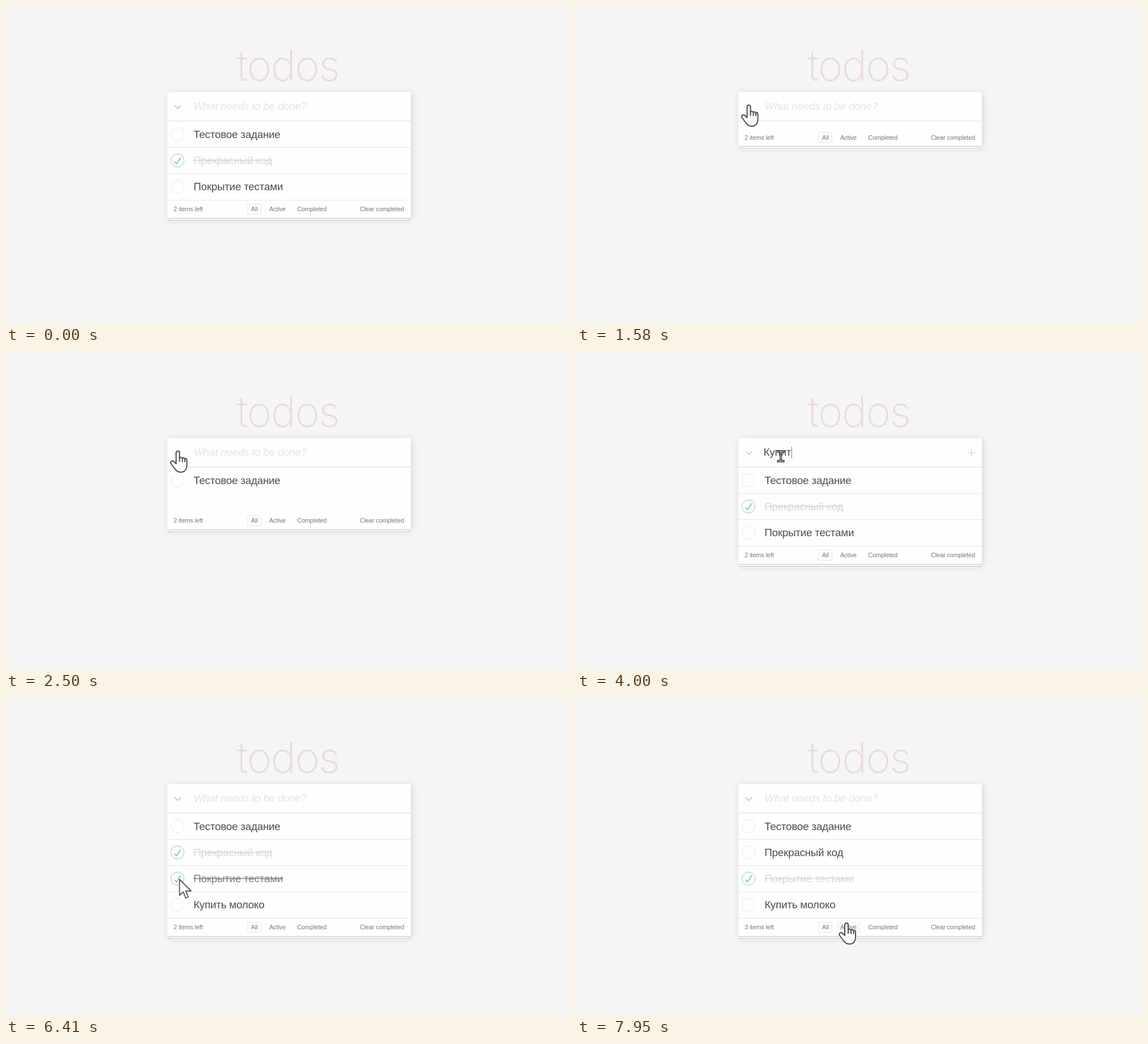
Animation, 998 px wide and 561 px high, one loop 8000 ms. Source, as an HTML page:

```html
<!DOCTYPE html>
<html lang="ru">
<head>
<meta charset="utf-8">
<title>todos</title>
<style>
  html, body { margin: 0; width: 100%; height: 100%; overflow: hidden; background: #f5f5f5; }
  body { position: relative; font: 24px/1.2 "Liberation Sans", Arial, sans-serif; color: #4d4d4d; }
  #overlay { position: absolute; left: 0; top: 0; }
  #title { font: 200 75px Inter, Roboto, sans-serif; letter-spacing: -1.8px; fill: #ecdada; text-anchor: middle; }
  #app {
    position: absolute; left: 284.5px; top: 152px; width: 550px;
    transform: scale(.7818); transform-origin: 0 0;
    background: #fefefd; letter-spacing: -.25px;
    box-shadow: 3px 3px 16px rgba(0,0,0,.13);
  }
  header { position: relative; height: 65px; border-bottom: 1px solid #dcdcdc; box-shadow: inset 0 -2px 1px rgba(0,0,0,.03); }
  header span { position: absolute; left: 59px; top: 18px; white-space: pre; }
  #placeholder { font-style: italic; color: #e4e4e4; }
  #typed { left: 57px; }
  #caret { position: absolute; top: 19px; width: 1.3px; height: 27px; background: #555; }
  header svg { position: absolute; left: 0; top: 0; fill: none; stroke: #d6d6d6; }
  ul { position: relative; margin: 0; padding: 0; list-style: none; overflow: hidden; }
  li { position: absolute; left: 0; width: 550px; height: 59px; }
  li + li { box-shadow: 0 -1px #e4e4e4; }
  li span { position: absolute; left: 59px; top: 15px; white-space: nowrap; }
  li svg { position: absolute; left: 0; top: 9px; fill: none; overflow: visible; }
  footer { position: relative; height: 40px; border-top: 1px solid; font-size: 14px; line-height: 20px; color: #777; letter-spacing: -.12px; }
  footer::before {
    content: ""; position: absolute; left: 0; right: 0; bottom: 0; height: 50px;
    box-shadow: 0 1px 1px rgba(0,0,0,.2), 0 8px 0 -3px #f6f6f6, 0 9px 1px -3px rgba(0,0,0,.2),
                0 16px 0 -6px #f6f6f6, 0 17px 2px -6px rgba(0,0,0,.2);
  }
  footer div { position: absolute; top: 10px; left: 14px; right: 15px; }
  footer a { margin: 3px; padding: 3px 7px; border: 1px solid transparent; border-radius: 3px; }
  #all { border-color: rgba(175,47,47,.2); }
  #active.hover { border-color: rgba(175,47,47,.05); background: #faf9f9; }
</style>
</head>
<body>
<div id="app">
  <header>
    <span id="placeholder">What needs to be done?</span>
    <span id="typed"></span>
    <i id="caret"></i>
    <svg width="550" height="65">
      <path id="chevron" d="M-7.5 -3.5L0 3.2L7.5 -3.5"/>
      <path id="plus" d="M518 33h17M526.5 24.5v17" stroke-width="2"/>
    </svg>
  </header>
  <ul id="list"></ul>
  <footer id="footer">
    <div id="count"></div>
    <div style="text-align:center"><a id="all">All</a> <a id="active">Active</a> <a>Completed</a></div>
    <div style="text-align:right">Clear completed</div>
  </footer>
</div>
<svg id="overlay" width="998" height="561" viewBox="0 0 998 561">
  <text id="title" x="498" y="132">todos</text>
  <g id="cursor" stroke-linejoin="round" stroke-linecap="round">
    <path id="arrow" d="M.5 0V28L7 22L11.5 33L16 31L11.5 20.5H21Z" fill="#fff" stroke="#55555c" stroke-width="1.8"/>
    <g id="hand" fill="#fff" stroke="#4a4c58" stroke-width="2">
      <path d="M-3 22V3a3 3 0 0 1 6 0V12q2.5-2.500 5 .5q2.5-2 4.5 1q3.5-1.500 3.500 3V24C16 32 12 37 5 37C-1 37-3 34-6 30L-12 22C-14 18-10 15.5-7 18Z"/>
      <path d="M3 12v6M8 12.5v6M12.5 13.5v5" fill="none"/>
    </g>
    <g id="beam" fill="none">
      <path d="M-4.5 -8.5H4.5M0 -8.5V8.5M-4.5 8.5H4.5" stroke="#333" stroke-width="4" stroke-linecap="square"/>
      <path d="M-4.5 -8.5H4.5M0 -8.5V8.5M-4.5 8.5H4.5" stroke="#ddd" stroke-width="1.2"/>
    </g>
  </g>
</svg>
<script>
const LOOP = 8000, ROW = 59;
const $ = id => document.getElementById(id);
const clamp = v => Math.min(1, Math.max(0, v));
const span = (t, from, to) => clamp((t - from) / (to - from));
const mix = (a, b, p) => a + (b - a) * p;
const show = (el, on) => { el.style.visibility = on ? 'visible' : 'hidden'; };

const ease = {
  in: p => p ** 1.6,
  out: p => 1 - (1 - p) ** 2,
  both: p => p * p * (3 - 2 * p)
};

// [start, end, x, y, easing]
const moves = [
  [0, 0, 70, -40, 'both'],
  [10, 290, 133, 73, 'out'],
  [630, 1120, 303.5, 175, 'both'],
  [2840, 3040, 360, 184, 'both'],
  [5600, 5830, 334, 267, 'in'],
  [5830, 6290, 306, 320, 'out'],
  [6510, 7030, 307, 283, 'both'],
  [7350, 7950, 476, 397, 'both']
];

const phrase = 'Купить молоко';
const keyTimes = [3370, 3540, 3700, 3910, 3990, 4070, 4140, 4210, 4290, 4350, 4410, 4470, 4540];
const ENTER = 4700;
const caretOn = [[160, 450], [740, 1030], [3040, 4830], [5040, 5330], [5620, 5910], [6200, 6330]];

const FADE = 220;
const items = [
  { text: 'Тестовое задание', done: () => 0 },
  { text: 'Прекрасный код', done: t => 1 - span(t, 7170, 7170 + FADE), checked: t => t < 7170 },
  { text: 'Покрытие тестами', done: t => span(t, 6330, 6330 + FADE), checked: t => t >= 6330 },
  { text: phrase, done: () => 0 }
];

items.forEach((item, i) => {
  const li = document.createElement('li');
  li.style.top = i * ROW + 'px';
  li.innerHTML = `<svg width="46" height="40"><g transform="translate(8.15 5.33) scale(.2963)">
    <circle cx="50" cy="50" r="50" stroke-width="4"/>
    <path d="M72 25L42 71 27 56l-4 4 20 20 34-52z" fill="#55b3a3"/></g></svg><span>${item.text}</span>`;
  $('list').append(li);
  item.li = li;
  item.label = li.querySelector('span');
  item.ring = li.querySelector('circle');
  item.tick = li.querySelector('path');
});

function cursorAt(t) {
  let [, , x, y] = moves[0];
  for (const [from, to, nx, ny, kind] of moves.slice(1)) {
    if (t < from) break;
    const p = ease[kind](span(t, from, to));
    x = mix(x, nx, p);
    y = mix(y, ny, p);
  }
  return [x, y];
}

function cursorKind(x, y) {
  if (x < 285 || y < 152) return 'arrow';
  if (y < 204) return x < 322 ? 'hand' : 'beam';
  if (y > 391) return x > 457 && x < 499 ? 'hand' : 'arrow';
  const offset = (y - 204) % 46 - 23;
  return x > 331 && x < 490 && Math.abs(offset) < 11 ? 'beam' : 'arrow';
}

function drawList(t) {
  const n = t < ENTER ? 3 : 4, full = n * ROW;
  const open = t < 2000 ? (1 - span(t, 1270, 1740)) ** 2.3 : span(t, 2160, 2600) ** 2.28;
  const height = full * open;
  const reveal = i => clamp((height - ROW * i - 40) / 18);

  $('list').style.height = height + 'px';
  $('footer').style.borderColor = `rgba(222,222,222,${reveal(n - 1)})`;
  let left = n;
  items.forEach((item, i) => {
    const checked = Boolean(item.checked && item.checked(t));
    const grey = Math.round(mix(77, 217, item.done(t)));
    if (checked) left--;
    item.li.style.opacity = i < n ? reveal(i) : 0;
    item.label.style.color = `rgb(${grey},${grey},${grey})`;
    item.label.style.textDecoration = checked ? 'line-through' : 'none';
    item.ring.setAttribute('stroke', checked ? '#8cc5bb' : '#e6e6e6');
    show(item.tick, checked);
  });
  $('count').textContent = left + ' items left';
  return open;
}

function drawInput(t, open) {
  const typed = t < ENTER ? phrase.slice(0, keyTimes.filter(k => t >= k).length) : '';
  $('typed').textContent = typed;
  show($('placeholder'), !typed);
  show($('plus'), typed);
  show($('caret'), caretOn.some(([from, to]) => t >= from && t < to));
  $('caret').style.left = (typed ? 58 + $('typed').offsetWidth : 59) + 'px';
  $('chevron').setAttribute('transform', `translate(23.6 33.5) rotate(${-90 * (1 - open)})`);
  $('chevron').setAttribute('stroke-width', typed ? 2.6 : 3.6);
}

function drawCursor(t) {
  const [x, y] = cursorAt(t), kind = cursorKind(x, y);
  $('cursor').setAttribute('transform', `translate(${x} ${y})`);
  for (const name of ['arrow', 'hand', 'beam']) show($(name), name === kind);
  $('active').className = kind === 'hand' && y > 391 ? 'hover' : '';
}

function render() {
  const t = performance.now() % LOOP;
  drawInput(t, drawList(t));
  drawCursor(t);
  requestAnimationFrame(render);
}
render();
</script>
</body>
</html>
```
